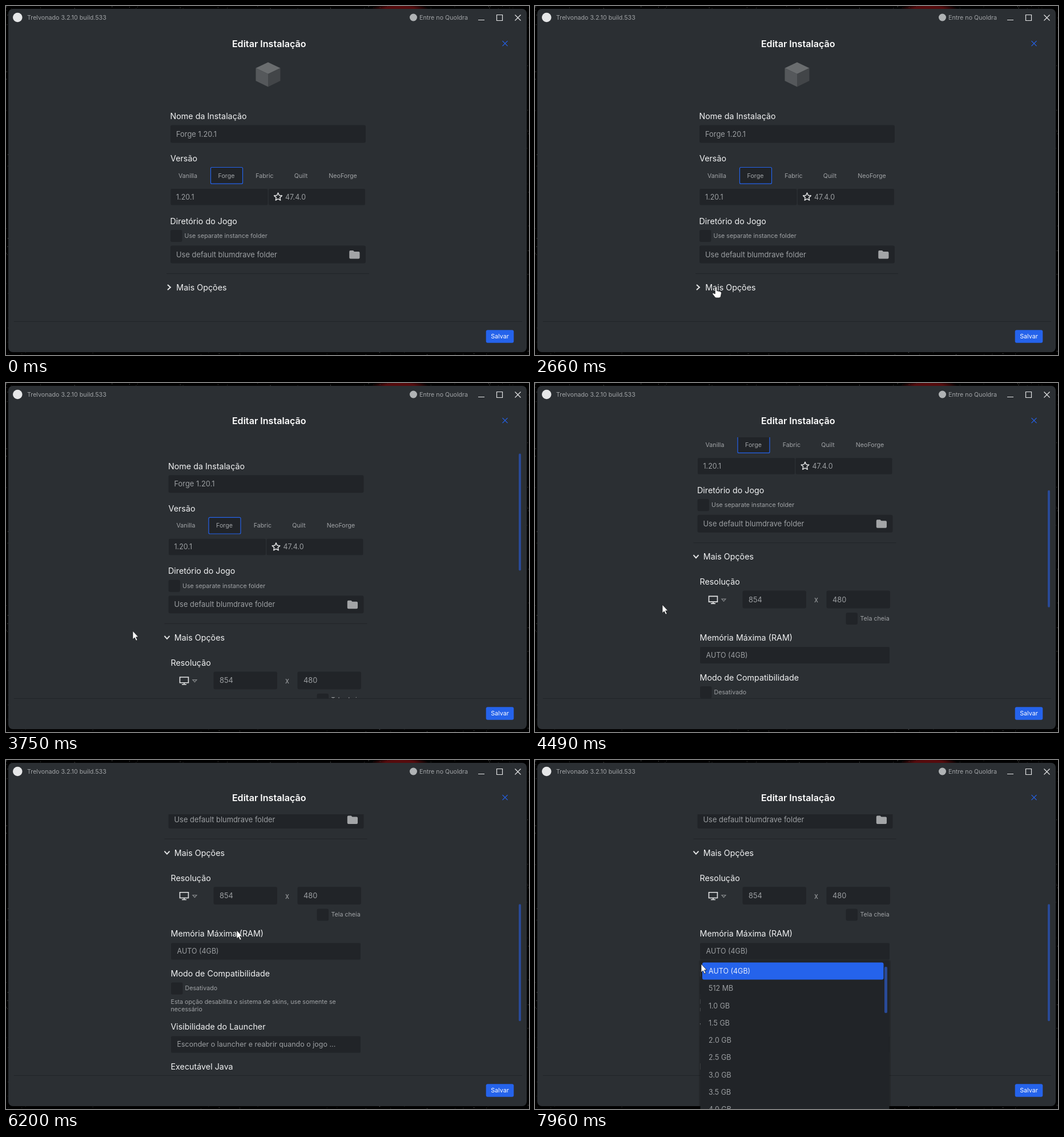
Recreate the animation shown at these times as an HTML page. Size 916x611 px, loop 8000 ms.

```html
<!DOCTYPE html>
<html lang="pt">
<head>
<meta charset="utf-8">
<title>Editar Instalação</title>
<style>
  html, body { margin: 0; width: 100%; height: 100%; overflow: hidden; background: #000; }
  svg { display: block; width: 916px; height: 611px; }
  text { font: 10.7px Inter, sans-serif; fill: #a0a3a6; dominant-baseline: central; }
  .label { font-size: 14.3px; fill: #f1f2f3; }
  .input { font-size: 12.9px; fill: #9b9ea1; }
  .select { font-size: 12.5px; fill: #9b9ea1; }
  .mid { text-anchor: middle; }
  .box { fill: #212428; }
  .line { fill: none; stroke: #e4e5e6; stroke-width: 1.2; }
</style>
</head>
<body>
<svg viewBox="0 0 916 611">
  <defs>
    <radialGradient id="glow">
      <stop offset=".5" stop-color="#560a0c"/><stop offset="1" stop-color="#560a0c" stop-opacity="0"/>
    </radialGradient>
    <clipPath id="viewport"><rect x="4" y="95" width="908" height="457"/></clipPath>
    <clipPath id="fold"><rect id="foldRect" x="270" y="510" width="400" height="0"/></clipPath>
  </defs>
  <rect width="916" height="611"/>
  <g id="specks"></g>
  <ellipse cx="690" cy="4" rx="50" ry="7" fill="url(#glow)"/>
  <rect x="4" y="5" width="908" height="601" rx="8" fill="#2b2f33"/>

  <circle cx="20.3" cy="20" r="8.3" fill="#e6e7e8"/>
  <text x="37" y="20">Trelvonado 3.2.10 build.533</text>
  <circle cx="713.5" cy="20" r="6.5" fill="#b0b3b5"/>
  <text x="724" y="20">Entre no Quoldra</text>
  <path class="line" d="M827 24.5h11M859.5 15.5h10v10h-10zM891.5 15.5l10 10m0-10l-10 10"/>

  <text class="mid" x="460.7" y="65.5" style="font-size:16.1px;font-weight:600;fill:#fff">Editar Instalação</text>
  <path d="M869.5 61.2l9 9m0-9l-9 9" stroke="#2563eb" stroke-width="1.2"/>

  <g clip-path="url(#viewport)">
    <g id="content">
      <path d="M459 98.500l21.500 10.200-21.500 10.300-21.500-10.300z" fill="#6a6d6f"/>
      <path d="M437.500 108.700l21.500 10.300v22.500l-21.500-10.500z" fill="#55585b"/>
      <path d="M480.500 108.700l-21.500 10.300v22.500l21.500-10.500z" fill="#424548"/>

      <text class="label" x="287.500" y="192.500">Nome da Instalação</text>
      <rect class="box" x="288" y="208.500" width="342" height="31" rx="3"/>
      <text class="input" x="298" y="224">Forge 1.20.1</text>

      <text class="label" x="288" y="266.500">Versão</text>
      <rect x="358.500" y="282.500" width="56" height="28.700" rx="2" fill="#212428" stroke="#2563eb" stroke-width="1.200"/>
      <g class="mid">
        <text x="318.500" y="297">Vanilla</text>
        <text x="386" y="297">Forge</text>
        <text x="453" y="297">Fabric</text>
        <text x="516.500" y="297">Quilt</text>
        <text x="590" y="297">NeoForge</text>
      </g>
      <rect class="box" x="288.500" y="320" width="170" height="28.500" rx="2"/>
      <rect class="box" x="460" y="320" width="169" height="28.500" rx="2"/>
      <text class="select" x="298" y="334">1.20.1</text>
      <path id="star" class="line" stroke-linejoin="round" style="stroke-width:1.5"/>
      <text class="select" x="489" y="334">47.4.0</text>

      <text class="label" x="287.500" y="376">Diretório do Jogo</text>
      <rect class="box" x="288" y="392" width="20.500" height="21" rx="3"/>
      <text x="312.500" y="402.500">Use separate instance folder</text>
      <rect class="box" x="288" y="419.500" width="342" height="31" rx="3"/>
      <text class="input" x="298" y="435">Use default blumdrave folder</text>
      <path d="M601.300 430q0-2 2-2h4.700l2 2h7.500q2 0 2 2v8.500q0 2-2 2h-14.200q-2 0-2-2z" fill="#a3a5a7"/>
      <path d="M281 468.500h355" stroke="#212428"/>

      <path id="chevron" class="line" d="M283 488l5 4.500-5 4.500" style="stroke-width:2"/>
      <text class="label" x="298.300" y="492.500">Mais Opções</text>

      <g clip-path="url(#fold)">
        <g transform="translate(3.5 330.4)">
          <text class="label" x="288.500" y="206">Resolução</text>
          <path class="line" style="stroke-width:1.600" d="M304.500 231.800h15v9.700h-15zM312 241.500v3M308 244.500h8"/>
          <path class="line" style="stroke:#85888b" d="M327 236.500l3.500 4 3.500-4z"/>
          <rect class="box" x="363.500" y="222" width="111.500" height="31" rx="3"/>
          <text class="input" x="374" y="237.500">854</text>
          <text class="input mid" x="492.500" y="238">x</text>
          <rect class="box" x="510.500" y="222" width="111.500" height="31" rx="3"/>
          <text class="input" x="521" y="237.500">480</text>
          <rect class="box" x="544.500" y="260.500" width="20.500" height="21" rx="3"/>
          <text x="569.500" y="271">Tela cheia</text>

          <text class="label" x="288.500" y="304">Memória Máxima (RAM)</text>
          <rect class="box" x="289" y="320.500" width="332" height="29" rx="2"/>
          <text class="select" x="299.500" y="335">AUTO (4GB)</text>

          <text class="label" x="288.500" y="373.500">Modo de Compatibilidade</text>
          <rect class="box" x="289" y="389.500" width="20.500" height="21" rx="3"/>
          <text x="313.500" y="400">Desativado</text>
          <text x="288.500" y="424">Esta opção desabilita o sistema de skins, use somente se</text>
          <text x="288.500" y="436.500">necessário</text>

          <text class="label" x="288.500" y="467">Visibilidade do Launcher</text>
          <rect class="box" x="289" y="483.500" width="332" height="29" rx="2"/>
          <text class="select" x="299.500" y="498">Esconder o launcher e reabrir quando o jogo ...</text>
          <text class="label" x="288.500" y="536.500">Executável Java</text>
        </g>
      </g>
    </g>
    <rect id="thumb" x="898" width="4" rx="2" fill="#294a97"/>
  </g>

  <path d="M14 552.5h890" stroke="#212428"/>
  <rect x="840.7" y="567.3" width="48.6" height="22.5" rx="3" fill="#2563eb"/>
  <text class="mid" x="865" y="578.5" style="fill:#fff">Salvar</text>

  <g id="dropdown">
    <rect x="287" y="350" width="336" height="265" rx="4" opacity=".15"/>
    <rect class="box" x="289.5" y="351" width="331" height="270" rx="3"/>
    <rect x="293" y="354.5" width="317.5" height="30" rx="3" fill="#2563eb"/>
    <rect x="612" y="362" width="5" height="81" rx="2" fill="#294a97"/>
  </g>

  <g id="cursor" stroke="#15171a" stroke-width=".8" stroke-linejoin="round" fill="#fff">
    <path id="arrow" d="M0 0V14.800l3.300-3 2.500 5.400 2.400-1.100-2.500-5.300H10z"/>
    <path id="hand" d="M-1.600 1.600a1.600 1.600 0 0 1 3.200 0V7l6 1.400q2.200.6 2 2.800l-1 5.500q-.6 2.800-3.400 2.800H1q-2 0-3-1.500L-6.200 12.500q.4-1.800 2.200-1.300L-1.600 12.600z"/>
  </g>
</svg>
<script>
const LOOP = 8000, NOTCH = 47.2;
const $ = id => document.getElementById(id);
const clamp = v => Math.max(0, Math.min(1, v));
const set = (id, attrs) => { for (const k in attrs) $(id).setAttribute(k, attrs[k]); };

function add(parent, tag, attrs, text = '') {
  const el = document.createElementNS('http://www.w3.org/2000/svg', tag);
  for (const k in attrs) el.setAttribute(k, attrs[k]);
  el.textContent = text;
  $(parent).append(el);
}

// Faint specks on the desktop behind the window
let seed = 7;
const random = () => (seed = seed * 16807 % 2147483647) / 2147483647;
for (let i = 0; i < 90; i++) {
  const along = random(), far = random() < .5, depth = random() * 4;
  const horizontal = random() < .6;
  add('specks', 'rect', {
    x: horizontal ? along * 916 : far ? 912 + depth : depth,
    y: horizontal ? (far ? 606 + depth : depth) : along * 611,
    width: 1, height: 1, fill: '#fff', opacity: .1 + random() * .4
  });
}

const starPoints = Array.from({ length: 10 }, (_, i) => {
  const a = i * Math.PI / 5, r = i % 2 ? 3.4 : 7.2;
  return [476.5 + r * Math.sin(a), 334.3 - r * Math.cos(a)];
});
set('star', { d: 'M' + starPoints.join('L') + 'z' });

for (let i = 0; i < 9; i++) {
  const name = i === 0 ? 'AUTO (4GB)' : i === 1 ? '512 MB' : (i / 2).toFixed(1) + ' GB';
  add('dropdown', 'text',
    { class: 'select', x: 304, y: 369.7 + 30.25 * i, style: i ? '' : 'fill:#e8edfb' }, name);
}

// Pointer path: time, x, y
const path = [
  [520, 672, 577], [1200, 326, 499], [1350, 324, 497], [1560, 316, 491],
  [1800, 345, 495], [2100, 301, 493], [2500, 318, 492], [2800, 316, 491],
  [2940, 282, 478], [3210, 205, 441], [3420, 222, 434], [4020, 222, 434],
  [4200, 223, 388], [5300, 223, 388], [5900, 434, 302], [6200, 404, 298],
  [6600, 298, 318], [6950, 379, 329], [7150, 379, 334], [7280, 379, 334],
  [7420, 379, 336], [7690, 379, 336], [7960, 291, 357]
];
const scrollTimes = [3750, 4090, 4230, 4490, 4560, 4630, 5160];

function pointerAt(t) {
  const i = path.findIndex(p => p[0] > t);
  if (i < 0) return path.at(-1).slice(1);
  if (i === 0) return path[0].slice(1);
  const [t0, x0, y0] = path[i - 1], [t1, x1, y1] = path[i];
  const u = (t - t0) / (t1 - t0), k = u * u * (3 - 2 * u);
  return [x0 + (x1 - x0) * k, y0 + (y1 - y0) * k];
}

function draw(t) {
  const open = 1 - (1 - clamp((t - 2800) / 600)) ** 3;
  const height = 440 + 561 * open;
  const overflows = height > 457;
  const scroll = NOTCH * scrollTimes.filter(s => t >= s).length;
  set('content', { transform: `translate(${overflows ? -3.5 : 0} ${-scroll})` });
  set('foldRect', { height: 561 * open });
  set('chevron', { transform: `rotate(${90 * clamp((t - 2800) / 150)} 285.5 492.5)` });
  set('thumb', {
    y: 102 + scroll * .4545, height: 449 * 457 / height, opacity: overflows ? 1 : 0
  });
  set('dropdown', { opacity: clamp((t - 7240) / 160) });

  const [x, y] = pointerAt(t);
  const overButton = t < 2940 && x > 281 && y > 482 && y < 508;
  set('cursor', { transform: `translate(${x} ${y})`, opacity: t < 520 ? 0 : 1 });
  set('arrow', { opacity: overButton ? 0 : 1 });
  set('hand', { opacity: overButton ? 1 : 0 });
}

const start = performance.now();
function tick() {
  draw((performance.now() - start) % LOOP);
  requestAnimationFrame(tick);
}
tick();
</script>
</body>
</html>
```
